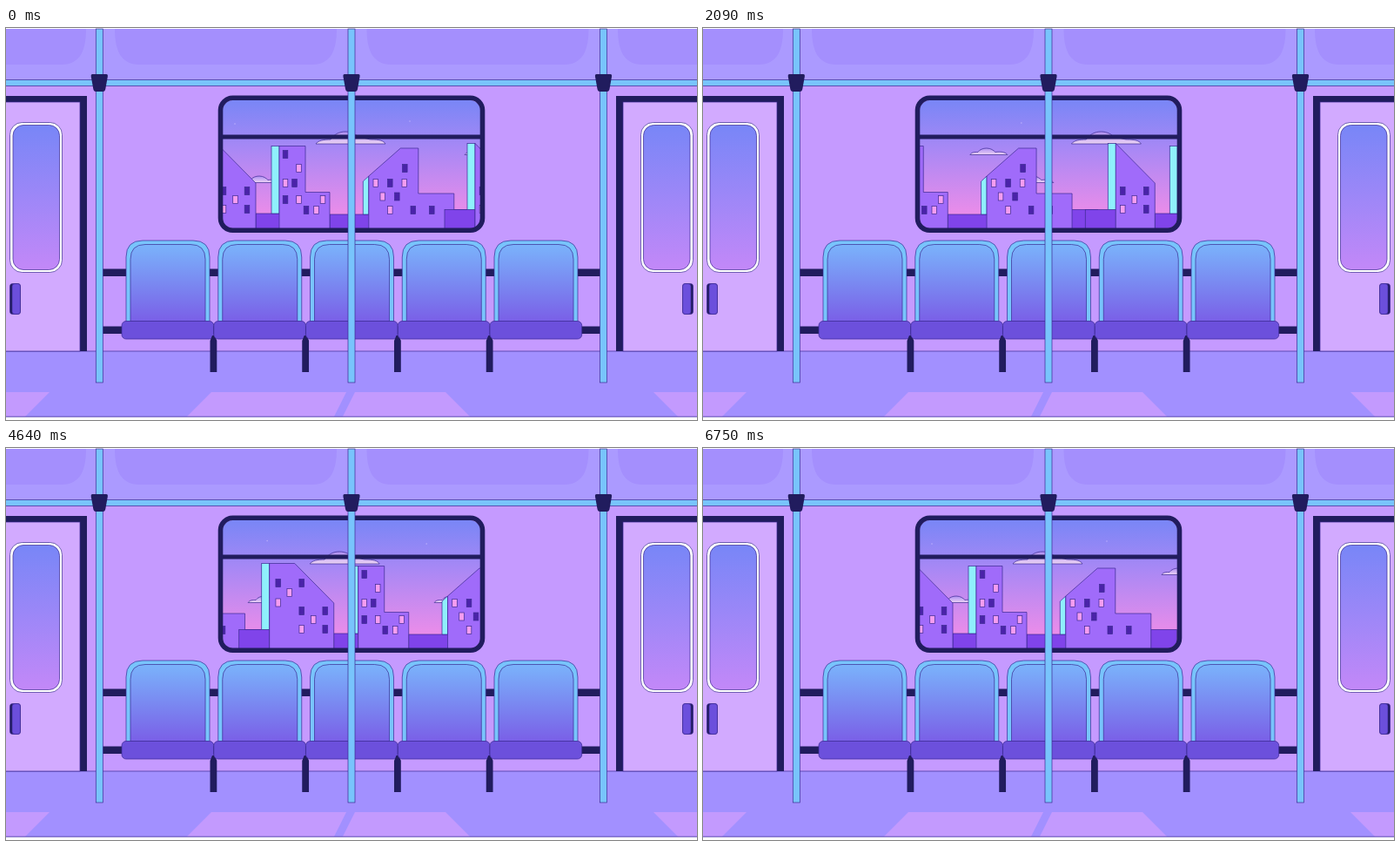
Animation, 794 px wide and 450 px high, one loop 6.82 s. Source, as an HTML page:

```html
<!DOCTYPE html>
<html lang="en">
<head>
<meta charset="utf-8">
<title>Train ride</title>
<style>
  html, body { margin: 0; width: 100%; height: 100%; overflow: hidden; background: #fff; }
  svg { display: block; width: 794px; height: 450px; }
  .line { stroke: #3c2a92; stroke-width: .7; }
  .dark { fill: #211c5e; }
</style>
</head>
<body>
<svg id="stage" viewBox="0 0 794 450" xmlns="http://www.w3.org/2000/svg">
  <defs>
    <linearGradient id="sky" gradientUnits="userSpaceOnUse" x1="0" y1="83" x2="0" y2="222">
      <stop offset="0" stop-color="#7986f6"/>
      <stop offset=".4" stop-color="#a888f5"/>
      <stop offset="1" stop-color="#f28de8"/>
    </linearGradient>
    <linearGradient id="glass" x2="0" y2="1">
      <stop offset="0" stop-color="#7886f7"/>
      <stop offset="1" stop-color="#c388f8"/>
    </linearGradient>
    <linearGradient id="cushion" x2="0" y2="1">
      <stop offset="0" stop-color="#7ab3fb"/>
      <stop offset="1" stop-color="#7a5fe7"/>
    </linearGradient>
    <linearGradient id="cloud" x2="0" y2="1">
      <stop offset="0" stop-color="#ad8df3"/>
      <stop offset="1" stop-color="#ecd3f4"/>
    </linearGradient>
    <clipPath id="pane"><rect x="249" y="83" width="296" height="147" rx="12"/></clipPath>
  </defs>
  <g id="room"></g>
  <g clip-path="url(#pane)">
    <rect x="249" y="83" width="296" height="147" fill="url(#sky)"/>
    <g id="clouds"></g>
    <g id="city"></g>
  </g>
  <g id="front"></g>
</svg>
<script>
const el = id => document.getElementById(id);
const rect = (x, y, w, h, fill, extra = '') =>
  `<rect x="${x}" y="${y}" width="${w}" height="${h}" fill="${fill}" ${extra}/>`;
const path = (d, fill, extra = '') => `<path d="${d}" fill="${fill}" ${extra}/>`;
const at = (x, y, content) => `<g transform="translate(${x} ${y})">${content}</g>`;
const LINE = 'class="line"';
const NAVY = '#211c5e', CYAN = '#78c4fc', BODY = '#a06bfa', SIDE = '#8ff0fc', GROUND = '#8044ea';

// Interior

function door() {
  return rect(-2, 78, 95, 293, NAVY) +
    rect(-2, 85, 87, 286, '#d2aaff', LINE) +
    rect(4.5, 108.5, 60, 172, '#fff', `rx="14" ${LINE}`) +
    rect(8, 111.5, 53.5, 166, 'url(#glass)', `rx="12" ${LINE}`) +
    rect(4.5, 293.5, 12, 35, NAVY, `rx="3" ${LINE}`) +
    rect(7, 293.5, 9.5, 35, '#6c4fdc', `rx="3" ${LINE}`);
}

function ceiling() {
  const panel = x => path(`M${x} 1C${x} 24 ${x + 6} 42 ${x + 28} 42H${x + 227}C${x + 249} 42 ${x + 255} 24 ${x + 255} 1Z`, '#a48ffd');
  return rect(0, 1, 794, 60, '#ab9aff') + [-163, 125, 414.5, 703].map(panel).join('');
}

function floor() {
  const glow = '#c39afe';
  return rect(0, 371, 794, 75.5, '#a290ff') +
    path('M0 418H50L22 446H0Z', glow) +
    path('M236 418H391L377 446H208Z', glow) +
    path('M401 418H505L533 446H387Z', glow) +
    path('M744 418H794V446H772Z', glow) +
    path('M0 371H794M0 446.2H794', 'none', LINE);
}

function seat(i) {
  const x = 138 + i * 105.75;
  const back = (l, r, top, rad) =>
    `M${x + l} 337V${top + rad}Q${x + l} ${top} ${x + l + rad} ${top}H${x + r - rad}Q${x + r} ${top} ${x + r} ${top + rad}V337Z`;
  const leg = i < 4 ? path(`M${x + 99} 353H${x + 102}L${x + 104.3} 359V395H${x + 96.5}V359Z`, NAVY) : '';
  return path(back(0, 96, 244, 19), CYAN, LINE) +
    path(back(5, 91, 248.5, 17), 'url(#cushion)', LINE) +
    rect(x - 5, 336.5, 105.7, 20.5, '#6c50dc', `rx="5" ${LINE}`) + leg;
}

function pole(x) {
  return rect(x, 1, 8, 406, CYAN, LINE) +
    path(`M${x - 4} 53H${x + 12}Q${x + 14} 53 ${x + 13.5} 56L${x + 11} 70Q${x + 10.5} 73 ${x + 8} 73H${x}Q${x - 2.5} 73 ${x - 3} 70L${x - 5.5} 56Q${x - 6} 53 ${x - 4} 53Z`, NAVY);
}

el('room').innerHTML = rect(0, 1, 794, 445, '#c59aff') + ceiling() +
  rect(-2, 59.5, 798, 7, CYAN, LINE) + floor() + door() +
  `<g transform="translate(794 0) scale(-1 1)">${door()}</g>`;

el('front').innerHTML =
  rect(249, 122.5, 297, 5, NAVY) +
  rect(246.5, 80.3, 301, 152, 'none', `rx="14" stroke="${NAVY}" stroke-width="5.6"`) +
  rect(111, 276.5, 572, 8.5, NAVY) + rect(111, 342.5, 572, 8.5, NAVY) +
  [0, 1, 2, 3, 4].map(seat).join('') +
  [103.3, 393, 682.5].map(pole).join('');

// City: every building is drawn relative to the left edge of its lit side

const panes = (color, spots) =>
  spots.map(([x, y]) => rect(x - 2.8, y - 4.5, 5.6, 9, color, LINE)).join('');
const windows = (dark, lit) => panes('#4a23a9', dark) + panes('#f59df0', lit);

function slopedBlock(x, wide) {
  const w = wide ? 29 : 0;
  const base = windows([[17, 187], [44, 187], [44, 208]], [[30.5, 197], [17, 208]]);
  const upper = windows([[19, 155], [46, 155]], [[32, 166], [19, 177.5]]);
  return at(x, 0,
    rect(-26, 208.5, 35, 24, GROUND, LINE) +
    rect(w + 54, 213, 28, 20, GROUND, LINE) +
    rect(0, 132.5, 9, 76, SIDE, LINE) +
    path(`M9 232V132.5H${9 + w}L${54 + w} 178V232Z`, BODY, LINE) +
    at(w, 0, base) + (wide ? upper : ''));
}

function towerBlock(x) {
  return at(x, 0,
    rect(67, 214, 46, 20, GROUND, LINE) +
    rect(0, 135.5, 9, 77.5, SIDE, LINE) +
    path('M9 232V135.5H39V188.5H67V232Z', BODY, LINE) +
    windows([[16, 145], [26.5, 178], [16, 197], [40, 209]],
            [[31.5, 161], [16, 178], [31.5, 197], [51.5, 209], [59, 197]]));
}

function gableBlock(x) {
  return at(x, 0,
    rect(104, 208.5, 30, 24, GROUND, LINE) +
    path('M0 214V176L6.5 170V214Z', SIDE, LINE) +
    path('M6.5 232V170L43 138H63.5V190H104.5V232Z', BODY, LINE) +
    windows([[48, 161], [31, 178], [39, 193.5], [57.5, 209], [79, 209]],
            [[14.5, 178], [47.5, 178], [22.5, 193.5], [31, 209]]));
}

const blocks = [[305, 72], [602, 72], [924, 71], [1255, 102, true], [1552, 72]];
el('city').innerHTML =
  blocks.map(([x, gap, wide]) => slopedBlock(x - gap, wide) + towerBlock(x) + gableBlock(x + 105.3)).join('');

// Sky: the clouds repeat after SKY_SPAN

const CITY_SPAN = 1247, SKY_SPAN = 708, LAST = 119;

const bigCloud = x => at(x, 133,
  path('M0 0C3 -4 9 -5 17 -5C21 -11 27 -14 34 -14C41 -14 46 -11 50 -7C58 -7 60 -5 64 -5C72 -5 78 -4 80 0Z', 'url(#cloud)', LINE));
const smallCloud = (x, y) => at(x, y,
  path('M0 0C2 -3 5 -3 9 -3C11 -6 15 -7.5 19 -7.5C24 -7.5 27 -5 29 -3C35 -4 41 -3 43 0Z', 'url(#cloud)', LINE));
const star = (x, y) => `<circle cx="${x}" cy="${y}" r=".7" fill="#d9c8ff" opacity=".7"/>`;

const skyTile =
  [[464, 107], [586, 109], [788, 106.5], [971, 110]].map(s => star(...s)).join('') +
  [356, 643.5, 837].map(bigCloud).join('') +
  [[527, 145.5], [447, 195.5], [580, 177.5], [766, 177.5], [894, 202.5], [980, 177.5]]
    .map(c => smallCloud(...c)).join('');
el('clouds').innerHTML = [-SKY_SPAN, 0, SKY_SPAN].map(x => at(x, 0, skyTile)).join('');

// Motion: steps last 50, 70 and 50 ms in turn

const LOOP = 6820;

function stepAt(time) {
  const rest = time % 170;
  const step = 3 * Math.floor(time / 170) + (rest >= 50) + (rest >= 120);
  return Math.min(step, LAST);
}

function render(time) {
  const progress = stepAt(time % LOOP) / LAST;
  el('city').setAttribute('transform', `translate(${-CITY_SPAN * progress} 0)`);
  el('clouds').setAttribute('transform', `translate(${-SKY_SPAN * progress} 0)`);
}

const start = performance.now();
function tick() {
  render(performance.now() - start);
  requestAnimationFrame(tick);
}
tick();
</script>
</body>
</html>
```
